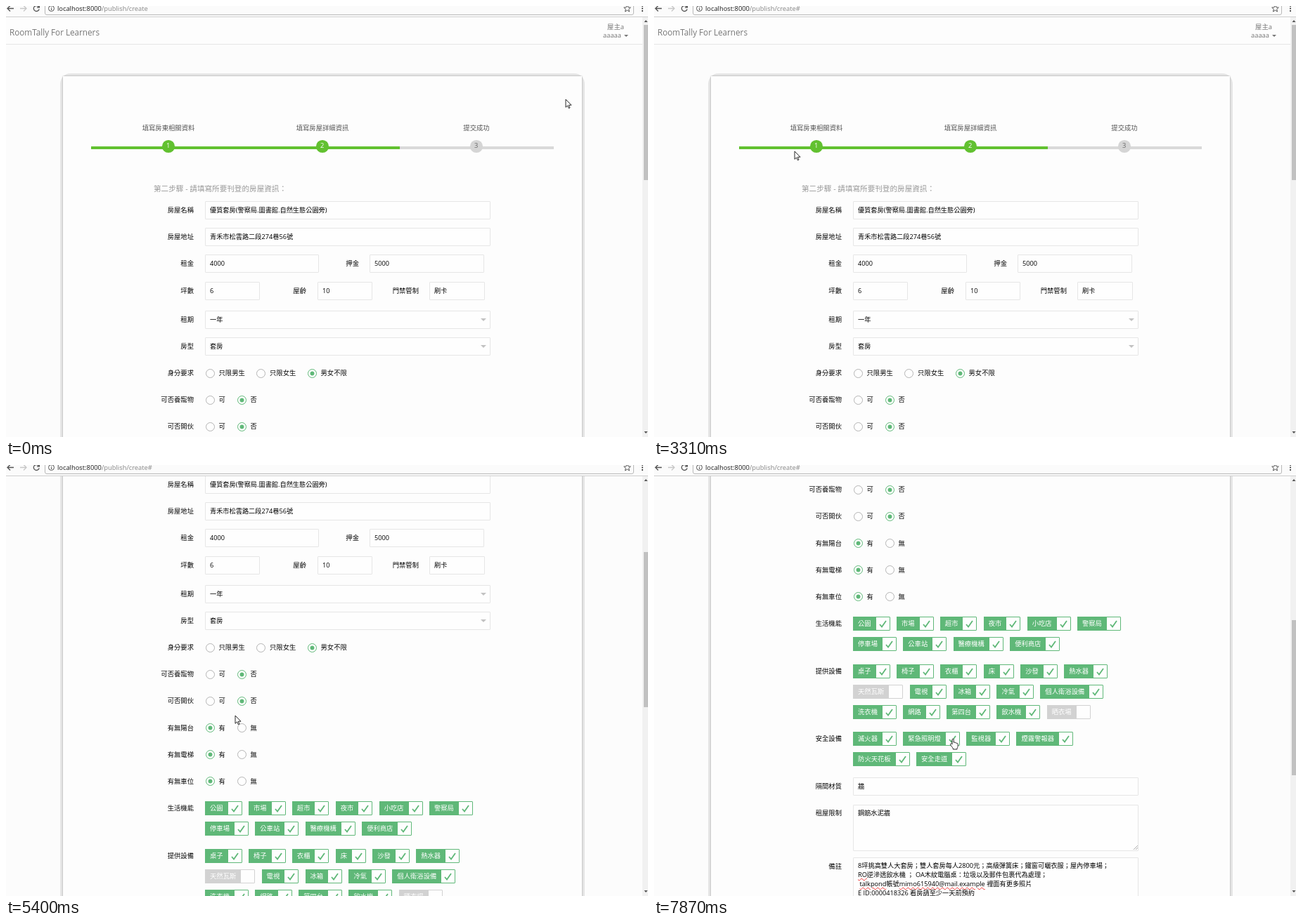
An HTML page for the animation above (8000 ms loop, 913 by 614 pixels).

```html
<!DOCTYPE html>
<html lang="zh-Hant">
<head>
<meta charset="utf-8">
<title>Publish form</title>
<style>
html, body { margin: 0; width: 100%; height: 100%; overflow: hidden; background: #fcfcfc; }
body { position: relative; font: 9.33px/20px "Open Sans", "Noto Sans CJK TC", "Noto Sans CJK", sans-serif; color: #080808; }
div, svg { position: absolute; box-sizing: border-box; }
svg { display: block; overflow: visible; }
.t { white-space: pre; height: 20px; }
.r { transform: translateX(-100%); }
.c { transform: translateX(-50%); }
.v { font-size: 9.2px; color: #000; }
.grey { color: #555; }

#bar { left: 0; top: 0; width: 913px; height: 16px; background: #fbfbfb; border-bottom: 1px solid #cfcfcf; overflow: hidden; }
#url { left: 73px; top: -6.5px; color: #888; }
#url b { font-weight: 400; color: #222; }
#view { left: 0; top: 16px; width: 905px; height: 598px; overflow: hidden; }
#page { left: 0; top: -16px; width: 905px; height: 1400px; }
.nav { background: #fdfdfd; border-bottom: 1px solid #e6e6e6; }
.brand { font-size: 11.7px; color: #777; }
.user { color: #777; }
.open .user { color: #dd3b32; }
.caret { border: 3px solid transparent; border-top-color: #777; border-bottom: 0; }
.open .caret { border-top-color: #dd3b32; }
.rim { background: #e6e6e6; border-radius: 15px 15px 0 0; }
.card { background: #fdfdfd; box-shadow: 0 0 2px rgba(0,0,0,.35); }
.line { background: #d9d9d9; }
.on { background: #62c130; }
.dot { border-radius: 50%; background: #d5d5d5; color: #666; text-align: center; line-height: 15.5px; }
.dot.on { background: #62c130; color: #fff; }
.title { font-size: 10.6px; color: #999; }
.box { background: #fefefe; border: 1px solid #e6e6e6; border-radius: 1px; }
.drop { border: 4px solid transparent; border-top-color: #c2c2c2; border-bottom: 0; }
.radio { border: 1px solid #b4b4b4; border-radius: 50%; background: #fefefe; }
.radio.sel { border-color: #5fb878; background: radial-gradient(circle, #5fb878 2.7px, #fefefe 3.3px); }
.tag { height: 20px; border: 1px solid #5fb878; border-radius: 1px; background: #fefefe; }
.tag div { left: -1px; top: -1px; right: 19px; height: 20px; background: #5fb878; color: #fff; text-align: center; white-space: pre; }
.tag svg { right: 4px; top: 4px; stroke: #5fb878; }
.tag.off { border-color: #d2d2d2; }
.tag.off div { background: #d2d2d2; }
.tag.off svg { stroke: none; }
.tag.off.hot { border-color: #c2c2c2; }
.tag.off.hot div { background: #c2c2c2; }
.tag.off.hot svg { stroke: #c2c2c2; }
.note { line-height: 13px; white-space: pre; font-size: 9.2px; color: #000; }
.note u { text-decoration: underline wavy #e33 .6px; text-underline-offset: 1px; }
#menu { background: #fefefe; border: 1px solid #d5d5d5; border-radius: 0 0 3px 3px; box-shadow: 0 4px 8px rgba(0,0,0,.175); color: #333; }
#menu .hover { left: 0; top: 3px; width: 104px; height: 18px; background: #f5f5f5; }
#menu .rule { left: 0; top: 24px; width: 104px; height: 1px; background: #e5e5e5; }
#status { left: -2px; top: 601px; width: 303px; height: 15px; background: #fcfcfc; border: 1px solid #e4e4e4; border-radius: 0 3px 0 0; font-size: 7.95px; line-height: 12px; padding-left: 1px; color: #555; white-space: pre; }
#track { left: 905px; top: 16px; width: 8px; height: 598px; background: #f1f1f1; }
#thumb { left: 2px; top: 11px; width: 6px; height: 221px; background: #c1c1c1; }
#cursor { left: 0; top: 0; width: 0; height: 0; }
#cursor path { fill: #fff; stroke: #111; stroke-width: .9; stroke-linejoin: round; }
</style>
</head>
<body>
<div id="view"><div id="page"></div></div>

<div id="bar">
  <svg width="913" height="16" fill="none" stroke="#555" stroke-width="1.3">
    <path d="M11 3.5H2M6 -.5L2 3.5 6 7.5"/>
    <path stroke="#c8c8c8" d="M20 3.5H29M25 -.5L29 3.5 25 7.5"/>
    <path d="M46.6 1.2A4 4 0 1 0 47.2 4.5M47.4 -1V2.2H44"/>
    <path stroke="#b9b9b9" stroke-width="1" d="M55.500 -3V10Q55.500 12.500 58 12.500H890Q892.500 12.500 892.500 10V-3"/>
    <g stroke-width="1"><circle cx="64.500" cy="3.500" r="4"/><path d="M64.500 3V6M64.500 1V2"/>
    <path d="M883.500 -1.500L884.900 1.900 888.300 2.200 885.700 4.500 886.500 8 883.500 6.100 880.500 8 881.300 4.500 878.700 2.200 882.100 1.900Z"/></g>
    <path stroke-width="2" d="M904 0H906M904 3.500H906M904 7H906"/>
  </svg>
  <div id="url" class="t"><b>localhost:8000</b>/publish/create<span id="hash">#</span></div>
</div>

<div id="track">
  <svg width="8" height="598" fill="#555"><path d="M2.500 7L5 4 7.500 7ZM2.500 590L5 593 7.500 590Z"/></svg>
  <div id="thumb"></div>
</div>
<div id="status"></div>
<div id="cursor">
  <svg id="arrow" width="9" height="14"><path d="M0 0V11.300L2.600 8.900 4.300 12.700 6 12 4.300 8.200H8Z"/></svg>
  <svg id="hand" width="12" height="16" style="left:-4px"><path d="M3 1.400C3 -.2 5.200 -.2 5.200 1.400V5.300C5.700 4.700 7.100 4.900 7.300 5.800 8 5.300 9.100 5.600 9.300 6.500 10.200 6.100 11.200 6.600 11.200 7.600V10.300C11.200 12 10.200 12.600 10 13.700V15H4.300V13.800C3.800 12.500 1.500 10.400 .6 8.500 0 7.100 1.500 6.300 2.400 7.300L3 8Z"/></svg>
</div>

<script>
const $ = id => document.getElementById(id);
const page = $('page');

function add(cls, x, y, w, h, html = '') {
  const el = document.createElement('div');
  el.className = cls;
  el.style.cssText = `left:${x}px;top:${y}px;` + (w ? `width:${w}px;` : '') + (h ? `height:${h}px` : '');
  el.innerHTML = html;
  page.append(el);
  return el;
}
const text = (x, y, s, cls = '') => add('t ' + cls, x, y - 10, 0, 0, s);
const label = (y, s, right = 267) => text(right, y, s, 'r');

function field(x, y, w, value) {
  add('box', x, y - 13, w, 26);
  text(x + 7, y, value, 'v');
}
function select(y, name, value) {
  label(y, name);
  field(283, y, 406, value);
  add('drop', 675, y - 2);
}
function radios(y, name, options, picked, step = 45) {
  label(y, name);
  options.forEach((s, i) => {
    const x = 290 + i * step;
    add('radio' + (i === picked ? ' sel' : ''), x - 6.5, y - 6.5, 13, 13);
    text(x + 12.5, y, s);
  });
}
// A leading "-" marks an unticked tag.
function tags(y, names) {
  let x = 283;
  return names.split(' ').map(s => {
    const off = s[0] === '-', name = off ? s.slice(1) : s, w = name.length * 9.35 + 34;
    const el = add('tag' + (off ? ' off' : ''), x, y - 10, w, 0,
      `<div>${name}</div><svg width="11" height="11" fill="none" stroke-width="1.8"><path d="M1 6L4 9.500 10 1"/></svg>`);
    x += w + 9.2;
    return el;
  });
}
function area(y, h, html) {
  add('box', 283, y, 406, h);
  add('note', 290, y + 5, 0, 0, html);
}

// Header and card
add('nav', 0, 16, 905, 39);
text(5, 37, 'RoomTally For Learners', 'brand');
text(867, 30, '屋主a', 'c user');
text(849, 42, 'aaaaa', 'user');
add('caret', 879, 41);
add('rim', 77, 96, 746, 1400);
add('card', 81, 100, 738, 1400);

// Progress
add('line', 121, 200, 658, 4);
add('line on', 121, 200, 439, 4);
['填寫房東相關資料', '填寫房屋詳細資訊', '提交成功'].forEach((s, i) => {
  const x = 231 + i * 219;
  text(x, 174, s, 'c grey');
  add('dot' + (i < 2 ? ' on' : ''), x - 9, 191, 17.5, 17.5, i + 1);
});

// Form
text(210, 260, '第二步驟 - 請填寫所要刊登的房屋資訊：', 'title');
label(291, '房屋名稱');
field(283, 291, 406, '優質套房(警察局.圖書館.自然生態公園旁)');
label(329, '房屋地址');
field(283, 329, 406, '青禾市松雲路二段274巷56號');
label(367, '租金');
field(283, 367, 162, '4000');
label(367, '押金', 502);
field(517, 367, 163, '5000');
label(405.5, '坪數');
field(283, 405.5, 78, '6');
label(405.5, '屋齡', 427);
field(443, 405.5, 78, '10');
label(405.5, '門禁管制', 587);
field(602, 405.5, 79, '刷卡');
select(447, '租期', '一年');
select(485, '房型', '套房');
radios(523, '身分要求', ['只限男生', '只限女生', '男女不限'], 2, 72.5);
radios(561, '可否養寵物', ['可', '否'], 1);
radios(599, '可否開伙', ['可', '否'], 1);
radios(637.5, '有無陽台', ['有', '無'], 0);
radios(675.5, '有無電梯', ['有', '無'], 0);
radios(713.5, '有無車位', ['有', '無'], 0);
label(752, '生活機能');
tags(752, '公園 市場 超市 夜市 小吃店 警察局');
tags(781, '停車場 公車站 醫療機構 便利商店');
label(820, '提供設備');
tags(820, '桌子 椅子 衣櫃 床 沙發 熱水器');
tags(849, '-天然瓦斯 電視 冰箱 冷氣 個人衛浴設備');
tags(878, '洗衣機 網路 第四台 飲水機 -晒衣場');
label(916, '安全設備');
const lamp = tags(916, '滅火器 緊急照明燈 監視器 煙霧警報器')[1];
tags(945, '防火天花板 安全走道');
label(984, '隔間材質');
field(283, 984, 406, '牆');
label(1022, '租屋限制');
area(1010, 66, '鋼筋水泥牆');
add('', 682, 1068, 0, 0, '<svg width="6" height="6" stroke="#999" stroke-width=".8"><path d="M0 6L6 0M3 6L6 3"/></svg>');
label(1098, '備註');
area(1085, 120, `8坪挑高雙人大套房；雙人套房每人2800元；高級彈簧床；鐵窗可曬衣服；屋內停車場；
<u>RO</u>逆滲透飲水機 ； OA木紋電腦桌：垃圾以及郵件包裹代為處理；
 <u>talkpond</u>帳號<u>mimo615940@mail.example</u> 裡面有更多照片
E ID:0000418326 看房請至少一天前預約`);

const menu = add('', 789, 55, 106, 50, '<div class="hover"></div><div class="rule"></div>' +
  '<div class="t" style="left:13px;top:1px">刊登房屋</div><div class="t" style="left:13px;top:28px">登出</div>');
menu.id = 'menu';
const hover = menu.firstChild;

// Bursts of screen updates: start, end, number of updates
const bursts = [[130, 820, 6], [1200, 2030, 7], [2310, 3310, 8], [3450, 4430, 8],
  [4580, 5550, 8], [5680, 6650, 8], [6770, 6920, 2], [7320, 7870, 5]];

// Pointer path: time, x, y
const path = [[0, 796, 133], [130, 800, 125], [406, 862, 62], [544, 869, 42], [820, 868, 40],
  [1200, 862, 46], [1339, 845, 62], [1477, 830, 77], [1615, 832, 72], [2030, 836, 66],
  [2310, 815, 80], [2740, 560, 130], [3310, 200, 207], [3450, 225, 205], [3870, 450, 190],
  [4150, 642, 164], [4430, 420, 252], [4718, 414, 274], [5411, 326, 357], [5550, 323, 368],
  [6096, 331, 400], [6650, 415, 397], [6920, 420, 391], [7320, 426, 390], [7458, 436, 390], [7870, 425, 390]];

function held(t) {
  let at = 0;
  for (const [a, b, n] of bursts) {
    if (t < a) break;
    const step = (b - a) / (n - 1);
    at = a + step * Math.min(n - 1, Math.floor((t - a) / step + .12));
  }
  return at;
}
function pointer(t) {
  const i = path.findIndex(p => p[0] > t);
  if (i < 0) return path[path.length - 1].slice(1);
  const [a, b] = [path[i - 1], path[i]], k = (t - a[0]) / (b[0] - a[0]);
  return [1, 2].map(j => Math.round(a[j] + (b[j] - a[j]) * k));
}
const smooth = (t, a, b) => {
  const k = Math.max(0, Math.min(1, (t - a) / (b - a)));
  return k * k * (3 - 2 * k);
};
const within = (t, ...spans) => spans.some(([a, b]) => t >= a && t < b);
const show = (el, on) => el.style.display = on ? 'block' : 'none';

const start = performance.now();
function draw() {
  const t = held((performance.now() - start) % 8000);
  const scroll = 263 * (smooth(t, 4700, 5330) + smooth(t, 5640, 6080));
  page.style.transform = `translateY(${-scroll}px)`;
  $('thumb').style.top = 11 + scroll * .369 + 'px';

  const onItem = within(t, [1300, 1420], [1560, 2300]);
  const onLink = onItem || within(t, [500, 1290], [6450, 8000]);
  const [x, y] = pointer(t);
  $('cursor').style.transform = `translate(${x}px,${y}px)`;
  show($('hand'), onLink);
  show($('arrow'), !onLink);

  page.classList.toggle('open', within(t, [500, 2720]));
  show(menu, within(t, [650, 2720]));
  show(hover, onItem);
  show($('status'), within(t, [500, 2580]));
  $('status').textContent = 'ocalhost:8000/publish/' + (t < 1300 ? 'create#' : 'lists');
  $('hash').style.visibility = t < 650 ? 'hidden' : 'visible';

  const off = within(t, [7440, 7720]);
  lamp.classList.toggle('off', off);
  lamp.classList.toggle('hot', off);
  requestAnimationFrame(draw);
}
draw();
</script>
</body>
</html>
```
